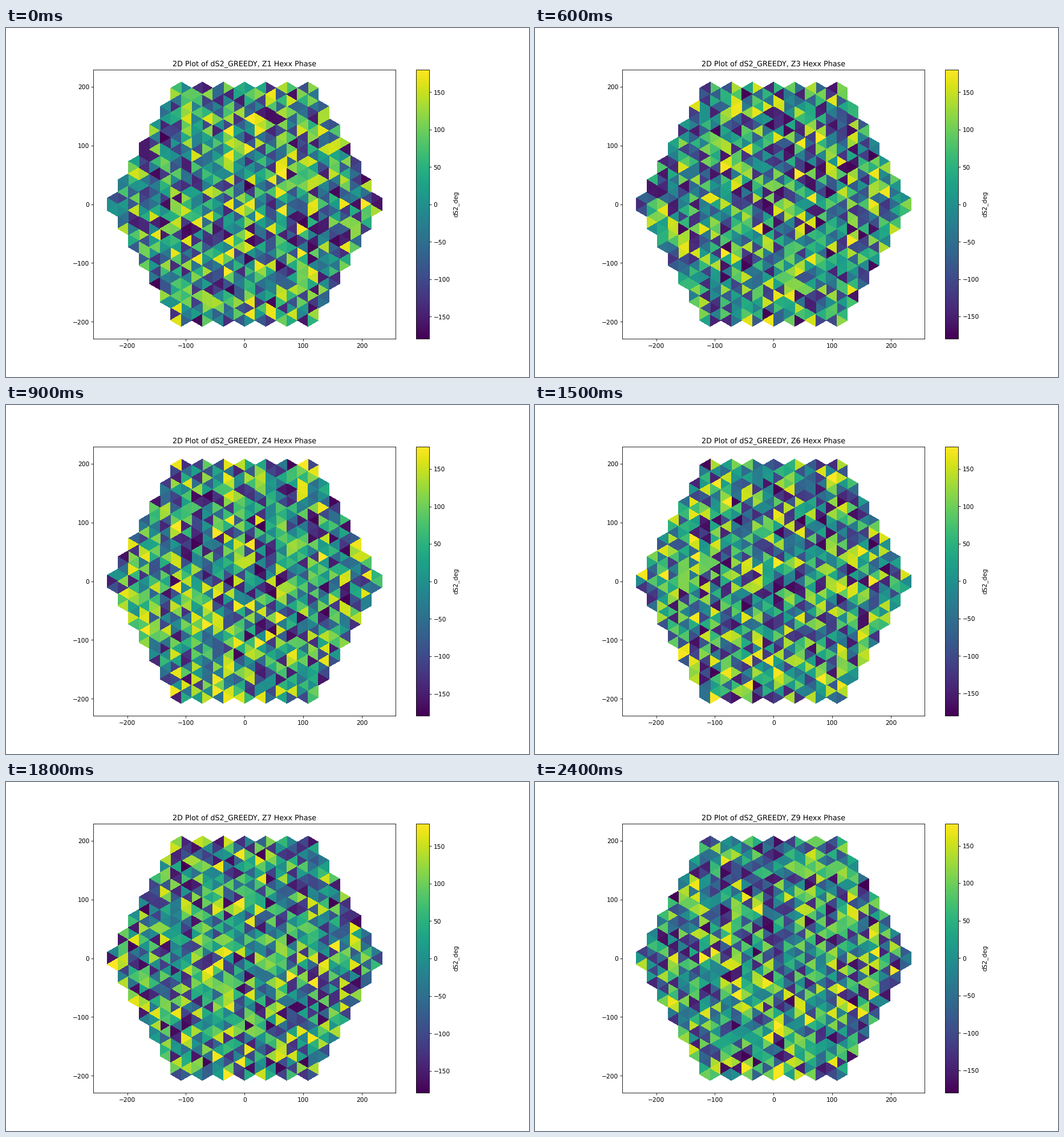
A matplotlib script for the animation above (2700 ms loop, 917 by 611 pixels).

```python
import numpy as np
import matplotlib.pyplot as plt
from matplotlib.animation import FuncAnimation
from matplotlib.collections import PolyCollection

WIDTH, HEIGHT, DPI = 917, 611, 76.4
PLANES = 9
RINGS = 6            # hexagon rings around the central cell
HALF_WIDTH = 18      # distance from a cell's centre to its flat side
SIDE = HALF_WIDTH * 2 / np.sqrt(3)


def cell_centres():
    for row in range(-RINGS, RINGS + 1):
        count = 2 * RINGS + 1 - abs(row)
        for col in range(count):
            yield np.array([HALF_WIDTH * (2 * col - count + 1), 1.5 * SIDE * row])


def cell_triangles(centre):
    angles = np.radians(30 + 60 * np.arange(7))
    corners = centre + SIDE * np.column_stack([np.cos(angles), np.sin(angles)])
    return [(centre, a, b) for a, b in zip(corners, corners[1:])]


def phases(plane):
    return np.random.default_rng(plane).uniform(-180, 180, len(triangles))


triangles = [t for centre in cell_centres() for t in cell_triangles(centre)]

plt.rcParams.update({"font.family": "DejaVu Sans", "text.hinting": "none"})
# The small surplus keeps the pixel size from rounding down.
fig, ax = plt.subplots(figsize=((WIDTH + 1e-3) / DPI, (HEIGHT + 1e-3) / DPI), dpi=DPI)

mesh = PolyCollection(triangles, cmap="viridis", edgecolors="none", antialiaseds=False)
mesh.set_array(phases(1))
ax.add_collection(mesh)
ax.autoscale_view()
ax.set_aspect("equal")
fig.colorbar(mesh, ax=ax, label="dS2_deg")
title = ax.set_title("")


def update(frame):
    plane = frame + 1
    mesh.set_array(phases(plane))
    mesh.autoscale()  # each plane sets its own colour scale
    title.set_text(f"2D Plot of dS2_GREEDY, Z{plane} Hexx Phase")
    return mesh, title


anim = FuncAnimation(fig, update, frames=PLANES, interval=300, repeat=True)
plt.show()
```
